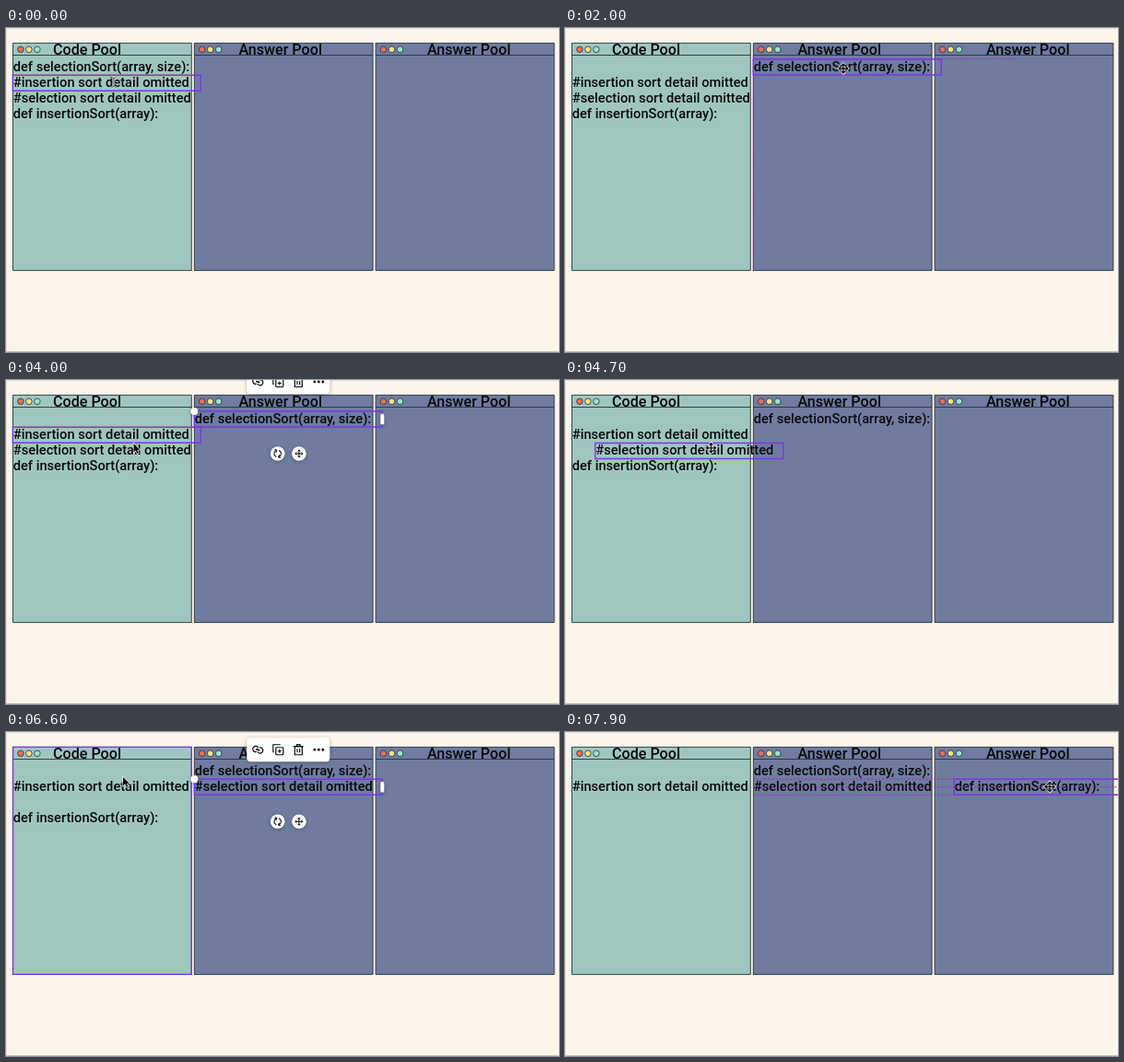
Recreate the animation shown at these times as an HTML page with a canvas. Size 600 by 352 pixels, loop 8000 ms.

```html
<!DOCTYPE html>
<html>
<head>
<meta charset="utf-8">
<style>
html, body { margin: 0; width: 100%; height: 100%; overflow: hidden; background: #fcf5ea; }
canvas { display: block; }
</style>
</head>
<body>
<canvas id="stage" width="600" height="352"></canvas>
<script>
const c = document.getElementById('stage').getContext('2d');
const LOOP = 8000, INK = '#080a0c', EDGE = '#28313f', PURPLE = '#7d35e8', MAGENTA = '#b01fc0';
const BOX_W = 204, BOX_H = 17, LEFT = 7.3, TOP = 34, ROW = 17.25;
const PANEL_W = 193.8, PANEL_Y = 16.4, PANEL_H = 247;
const EDGE_X = 204.3, CENTRE_X = 209.3; // left positions a dragged box snaps to

const panels = ['Code Pool', 'Answer Pool', 'Answer Pool'].map((title, i) => ({
  title, x: 7.5 + i * 196.8, titleX: [51, 252.5, 457][i], fill: i ? '#6f7c9f' : '#9fc6be'
}));

// press and drop: when the pointer grabs and releases the line
const items = [
  { text: 'def selectionSort(array, size):', press: 1000, drop: 2700 },
  { text: '#insertion sort detail omitted' },
  { text: '#selection sort detail omitted', press: 4500, drop: 5700 },
  { text: 'def insertionSort(array):', press: 7300, drop: LOOP }
].map((item, i) => ({ ...item, y: TOP + i * ROW }));

// pointer stops: time, x, y
const stops = [
  [0, 117, 59], [1000, 111, 44], [1800, 313, 44], [2000, 302, 44], [2700, 302, 44], [4000, 138.5, 68],
  [4500, 133, 76], [5400, 335, 59], [5700, 330, 59], [6600, 127, 48], [7300, 111, 94], [7900, 526, 59.5]
];

function pointer(t) {
  const i = stops.findIndex(s => s[0] > t);
  if (i < 0) return stops.at(-1).slice(1);
  const [a, b] = [stops[i - 1], stops[i]];
  const u = (t - a[0]) / (b[0] - a[0]), ease = u * u * (3 - 2 * u);
  return [1, 2].map(k => a[k] + (b[k] - a[k]) * ease);
}

function snap(value, targets, reach) {
  const near = targets.reduce((a, b) => Math.abs(b - value) < Math.abs(a - value) ? b : a);
  return Math.abs(near - value) <= reach ? near : value;
}

function place(item, t) {
  if (!(t > item.press)) return [LEFT, item.y];
  const [x0, y0] = pointer(item.press), [x, y] = pointer(Math.min(t, item.drop));
  return [
    snap(LEFT + x - x0, [EDGE_X, CENTRE_X], 7),
    snap(item.y + y - y0, items.map(other => other.y), 3)
  ];
}

function stroke(color, width, draw) {
  c.strokeStyle = color;
  c.lineWidth = width;
  c.beginPath();
  draw();
  c.stroke();
}

function lines(color, width, ...segments) {
  stroke(color, width, () => segments.forEach(([x, y, ...rest]) => {
    c.moveTo(x, y);
    for (let i = 0; i < rest.length; i += 2) c.lineTo(rest[i], rest[i + 1]);
  }));
}

function dashed(...segments) {
  c.setLineDash([2, 2]);
  lines(MAGENTA, 1, ...segments);
  c.setLineDash([]);
}

function disc(x, y, r, fill) {
  c.fillStyle = fill;
  c.beginPath();
  c.arc(x, y, r, 0, 7);
  c.fill();
}

function rounded(x, y, w, h, r, fill) {
  c.fillStyle = fill;
  c.beginPath();
  c.roundRect(x, y, w, h, r);
  c.fill();
}

function label(text, x, y, size, color = INK) {
  c.font = `500 ${size}px Roboto, sans-serif`;
  c.fillStyle = color;
  c.fillText(text, x, y);
}

function shadowed(draw) {
  c.save();
  c.shadowColor = 'rgba(30, 35, 50, .35)';
  c.shadowBlur = 4;
  c.shadowOffsetY = 1;
  draw();
  c.restore();
}

// Draw around a turned origin
function turned(x, y, angle, draw) {
  c.save();
  c.translate(x, y);
  c.rotate(angle);
  draw();
  c.restore();
}

function outline(x, y, w, h) {
  stroke(PURPLE, 1.4, () => c.rect(x, y, w, h));
}

function drawPanel({ x, title, titleX, fill }) {
  c.fillStyle = fill;
  c.fillRect(x, PANEL_Y, PANEL_W, PANEL_H);
  stroke(EDGE, .9, () => c.rect(x, PANEL_Y, PANEL_W, PANEL_H));
  lines(EDGE, .9, [x, 29.5, x + PANEL_W, 29.5]);
  ['#ee6b5c', '#f6e184', '#9be3cb'].forEach((color, i) => {
    const dotX = x + 8.4 + i * 9;
    disc(dotX, 23.3, 3.3, color);
    stroke(EDGE, .8, () => c.arc(dotX, 23.3, 3.3, 0, 7));
  });
  label(title, titleX, 28.6, 16.1);
}

function moveIcon(x, y, r, color, width) {
  const a = r * .35;
  for (let i = 0; i < 4; i++) turned(x, y, i * Math.PI / 2, () =>
    lines(color, width, [0, 0, r, 0], [r - a, -a, r, 0, r - a, a]));
}

function rotateIcon(x, y) {
  for (const angle of [0, Math.PI]) turned(x, y, angle, () => {
    stroke(INK, 1.1, () => c.arc(0, 0, 3.7, -1.2, 1.3));
    lines(INK, 1.1, [3.2, 4.4, 1, 3.6, 1.8, 1.4]);
  });
}

function drawToolbar(x, y) {
  shadowed(() => rounded(x - 45, y - 13, 90, 26, 4, '#fff'));
  // link
  for (const angle of [.3, .3 + Math.PI]) turned(x - 33, y, angle, () => stroke(INK, 1.2, () => {
    c.arc(2.6, 0, 3, -2.2, .9 + Math.PI / 2);
    c.moveTo(-2, 0);
    c.lineTo(2, 0);
  }));
  // duplicate
  stroke(INK, 1.2, () => c.roundRect(x - 13.5, y - 2.5, 8, 8, 1));
  lines(INK, 1.1, [x - 15.5, y + 2.5, x - 16.5, y + 2.5, x - 16.5, y - 5.5, x - 8.5, y - 5.5],
    [x - 11.5, y + 1.5, x - 7.5, y + 1.5], [x - 9.5, y - .5, x - 9.5, y + 3.5]);
  // bin
  stroke(INK, 1.2, () => {
    c.rect(x + 7, y - 3.5, 8, 9);
    c.rect(x + 9.3, y - 5.7, 3.4, 2.2);
  });
  lines(INK, 1.2, [x + 5.5, y - 3.5, x + 16.5, y - 3.5],
    [x + 9.7, y - 1, x + 9.7, y + 3], [x + 12.3, y - 1, x + 12.3, y + 3]);
  for (const d of [-4.5, 0, 4.5]) disc(x + 33 + d, y, 1.4, INK);
}

function drawHandles(x, y) {
  const mid = x + BOX_W / 2, buttonY = y + BOX_H + 29;
  shadowed(() => {
    disc(x, y, 4, '#fff');
    rounded(x + BOX_W - 2, y + 2.5, 4, 12, 2, '#fff');
    for (const side of [-1, 1]) disc(mid + side * 11.6, buttonY, 7.8, '#fff');
  });
  rotateIcon(mid - 11.6, buttonY);
  moveIcon(mid + 11.6, buttonY, 4, INK, 1);
  drawToolbar(mid, y - 32);
}

function badge(lineX, top) {
  lines(MAGENTA, 1, [lineX, top, lineX, top + ROW]);
  rounded(lineX + 2.5, top + 3, 16, 11, 5.5, '#c414d2');
  label('54', lineX + 6.3, top + 11.2, 7.5, '#fff');
}

function drawGuides([x, y], others) {
  if (x === EDGE_X) dashed([x, 30, x, 264]);
  if (x === EDGE_X && y === TOP) dashed([x, 33.5, 492, 33.5]);
  if (x === CENTRE_X) lines('#8a2a9c', 1, [311.5, 0, 311.5, 352]);

  const peers = others.filter(other => other[1] === y);
  if (!peers.length) return;
  const from = Math.max(...peers.map(peer => peer[0]));
  dashed(...[0, 8.5, 17].map(d => [from, y + d, x + BOX_W, y + d]));
  if (x === CENTRE_X) {
    badge(170.5, y - ROW);
    badge(109.5, y + ROW);
  }
}

function drawHover(px, py, spots) {
  const hit = spots.find(([x, y]) => px >= x && px <= x + BOX_W && py >= y && py < y + BOX_H);
  if (hit) return outline(...hit, BOX_W, BOX_H);
  const panel = panels.find(p => px >= p.x && px <= p.x + PANEL_W && py > PANEL_Y);
  if (panel) outline(panel.x, PANEL_Y, PANEL_W, PANEL_H);
}

function drawCursor(x, y, kind) {
  if (kind === 'move') {
    moveIcon(x, y, 5, '#fff', 2.8);
    moveIcon(x, y, 5, '#111', 1.4);
  } else if (kind === 'text') {
    for (const [color, width] of [['#fff', 2.4], ['#333', 1]])
      lines(color, width, [x - 2.5, y - 5.5, x, y - 4.5, x + 2.5, y - 5.5],
        [x, y - 4.5, x, y + 4.5], [x - 2.5, y + 5.5, x, y + 4.5, x + 2.5, y + 5.5]);
  } else {
    const arrow = new Path2D('M0 1v9.5l2.2-2 1.6 3.5 1.6-.8-1.5-3.3 2.9-.2z');
    turned(x, y, 0, () => {
      c.strokeStyle = '#fff';
      c.lineWidth = 1.2;
      c.stroke(arrow);
      c.fillStyle = '#111';
      c.fill(arrow);
    });
  }
}

function draw(t) {
  c.fillStyle = '#fcf5ea';
  c.fillRect(0, 0, 600, 352);
  lines('#dcdcdc', 1, [.5, 352, .5, .5, 600, .5]);
  lines('#c9c7c4', 1, [0, 351.5, 600, 351.5]);
  panels.forEach(drawPanel);

  const [px, py] = pointer(t);
  const spots = items.map(item => place(item, t));
  const selected = items.findLastIndex(item => item.press <= t);
  const dragged = items.findIndex(item => t > item.press && t <= item.drop);

  items.forEach(({ text }, i) => label(text, spots[i][0] + .4, spots[i][1] + 12.5, 14.65));
  if (dragged < 0) drawHover(px, py, spots);
  else drawGuides(spots[dragged], spots.filter((_, i) => i !== dragged));
  if (selected >= 0) {
    outline(...spots[selected], BOX_W, BOX_H);
    if (dragged < 0) drawHandles(...spots[selected]);
  }
  drawCursor(px, py, dragged >= 0 ? 'move' : selected < 1 && t < 2000 ? 'text' : 'arrow');
}

function tick() {
  draw(Math.floor(performance.now() % LOOP / 100) * 100);
  requestAnimationFrame(tick);
}
tick();
</script>
</body>
</html>
```
